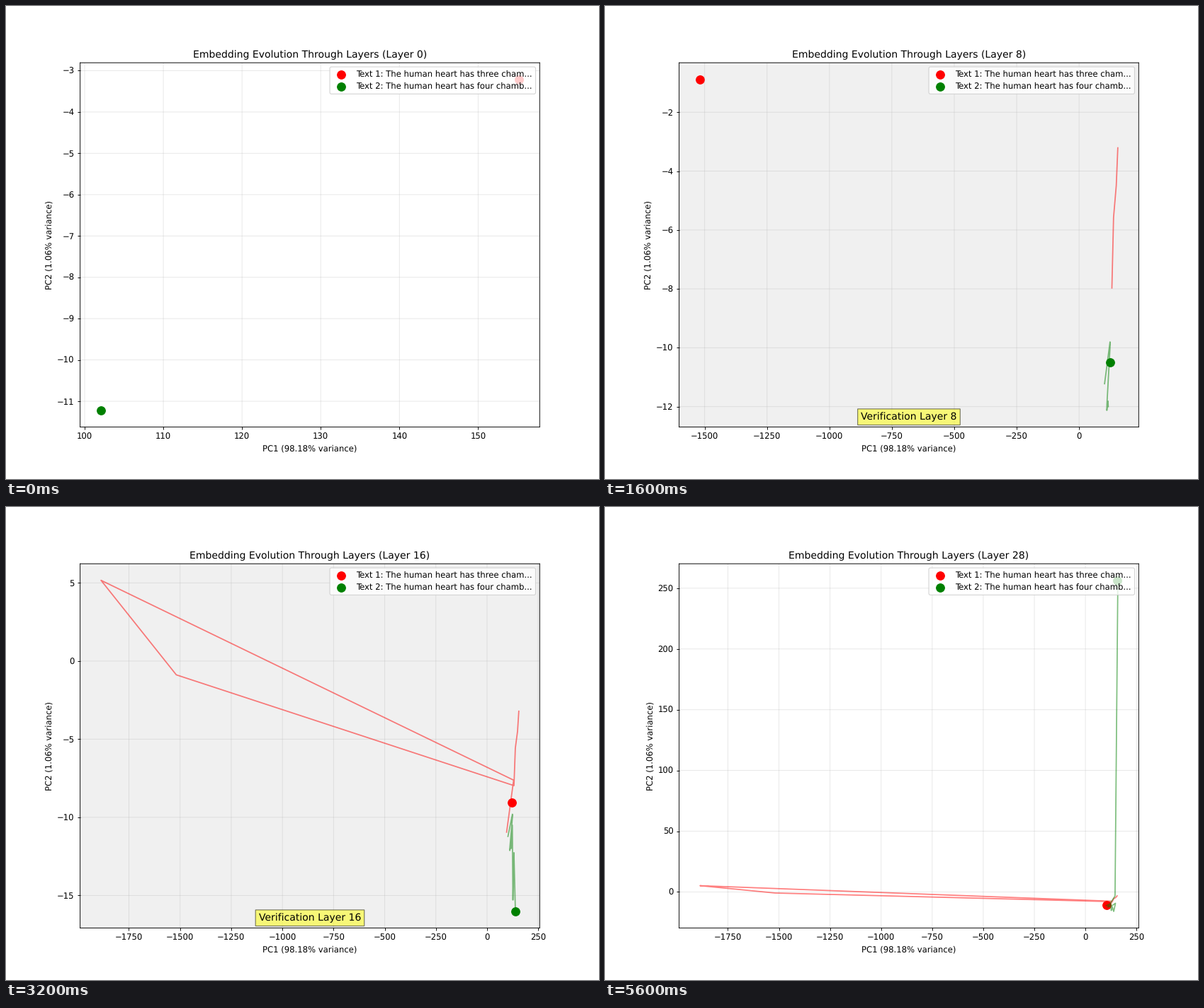
A matplotlib script that plays this animation: 837 px wide and 669 px high, repeating every 5.8 s.

```python
import matplotlib.pyplot as plt
import numpy as np
from matplotlib.animation import FuncAnimation

DPI = 83.7
LAYERS = 29
VERIFICATION = {*range(5, 10), *range(15, 25)}

# Unhinted text and unsnapped lines keep sub-pixel positions
plt.rcParams.update({"text.hinting": "none", "path.snap": False})


def trajectory(*stops):
    """Points per layer: ease out from each (layer, pc1, pc2) stop to the next."""
    stops = np.array(stops)
    layers = np.arange(LAYERS)
    i = np.searchsorted(stops[:, 0], layers, side="right") - 1
    a, b = stops[i], stops[np.minimum(i + 1, len(stops) - 1)]
    u = (layers - a[:, 0]) / np.maximum(b[:, 0] - a[:, 0], 1)
    eased = 1 - (1 - u) ** 5
    return a[:, 1:] + (b - a)[:, 1:] * eased[:, None]


SERIES = [
    ("red", "Text 1: The human heart has three cham...", trajectory(
        (0, 155.17, -3.209), (2, 149, -4.49), (5, 138.16, -5.57), (7, 131.5, -7.97),
        (8, -1518.5, -0.882), (11, -1886.3, 5.166), (12, 129.8, -7.62),
        (15, 95.5, -10.95), (19, 128.5, -8.45), (22, 114, -10), (25, 126.4, -9.14),
        (28, 103, -11))),
    ("green", "Text 2: The human heart has four chamb...", trajectory(
        (0, 102.08, -11.222), (1, 124, -9.8), (2, 124.5, -9.91), (3, 111.5, -11.93),
        (4, 111.3, -12.128), (5, 115.7, -11.81), (7, 117, -12), (8, 123.5, -10.5),
        (12, 126.4, -15.29), (14, 131.3, -12.26), (16, 138.5, -16.02),
        (20, 147.1, -9.32), (22, 130, -11.3), (24, 110.5, -12.42),
        (25, 144.6, -3.35), (26, 145, -2), (27, 158.5, 252), (28, 155.2, 256.5))),
]

fig, ax = plt.subplots(figsize=(837 / DPI, (669 + 1e-6) / DPI), dpi=DPI)


def draw(layer):
    ax.clear()
    checking = layer in VERIFICATION
    ax.set_facecolor("#f0f0f0" if checking else "white")

    for color, label, path in SERIES:
        ax.plot(*path[:layer].T, color=color, alpha=0.5)
        ax.scatter(*path[layer], color=color, s=100, label=label)

    if checking:
        ax.text(0.5, 0.02, f"Verification Layer {layer}", transform=ax.transAxes,
                ha="center", fontsize=12, bbox=dict(facecolor="yellow", alpha=0.5))

    ax.set_title(f"Embedding Evolution Through Layers (Layer {layer})")
    ax.set_xlabel("PC1 (98.18% variance)")
    ax.set_ylabel("PC2 (1.06% variance)")
    ax.grid(True, alpha=0.3)
    ax.legend(loc="upper right")


anim = FuncAnimation(fig, draw, frames=LAYERS, interval=200, repeat=True, repeat_delay=0)
plt.show()
```
